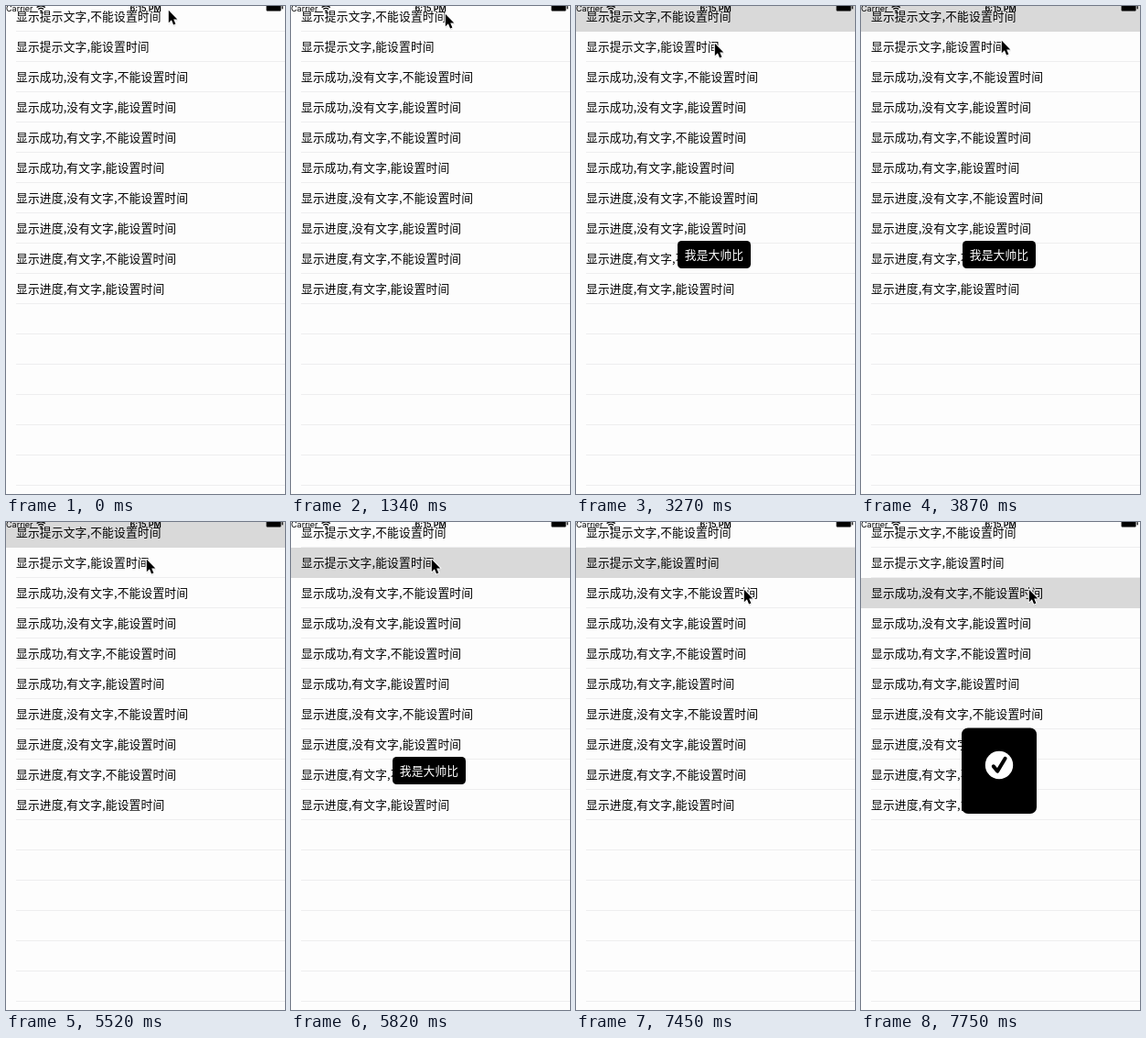
An HTML page for the animation above (8000 ms loop, 305 by 532 pixels).

```html
<!DOCTYPE html>
<html lang="zh-CN">
<head>
<meta charset="utf-8">
<style>
html, body { margin: 0; width: 100%; height: 100%; overflow: hidden; background: #fdfdfd; }
svg { display: block; width: 100vw; height: 100vh; }
.cjk { font: 12.75px "Noto Sans CJK SC", "Noto Sans CJK", sans-serif; letter-spacing: .16px; }
.bar { font: 9px Inter, "Liberation Sans", sans-serif; }
</style>
</head>
<body>
<svg viewBox="0 0 305 532" xmlns="http://www.w3.org/2000/svg">
  <g id="lines" fill="#eeeeef"></g>
  <rect id="pick" width="305" height="33" fill="#d9d9d9"/>
  <g id="rows" class="cjk"></g>

  <g class="bar">
    <text x="0" y="6.4">Carrier</text>
    <path d="M33.6 1.6Q38.2 -2 42.8 1.6M35.3 3.5Q38.2 1.3 41.1 3.5"
      fill="none" stroke="#000" stroke-width="1.3"/>
    <path d="M36.6 5Q38.2 3.8 39.8 5L38.2 6.8Z"/>
    <text x="152.7" y="6.4" text-anchor="middle" font-weight="600">6:15 PM</text>
    <rect x="284.6" y="-2" width="16" height="7.5" rx="1"/>
    <rect x="301.6" y="0" width="1.2" height="3.4" rx=".6"/>
  </g>

  <g id="toast">
    <rect x="111" y="256" width="80" height="30" rx="4.5"/>
    <text class="cjk" x="151" y="276" text-anchor="middle" fill="#fff">我是大帅比</text>
  </g>

  <g id="done">
    <rect x="110" y="224.5" width="82" height="93.5" rx="7"/>
    <circle cx="151" cy="265" r="15.2" fill="#fff"/>
    <path d="M144.8 266.4L149.2 271.6L157.6 257.8" fill="none" stroke="#000"
      stroke-width="4" stroke-linecap="round" stroke-linejoin="round"/>
  </g>

  <g id="cursor" stroke-linejoin="round">
    <path d="M.3 1.5V14.5L3.3 11.8L5.5 17L7.9 16L5.7 11H9.8Z" stroke="#000" opacity=".15"/>
    <path d="M0 0V13.4L3.1 10.5L5.3 15.8L7.6 14.8L5.4 9.7H9.5Z" stroke="#fff" stroke-width="2"
      paint-order="stroke"/>
  </g>
</svg>
<script>
const LOOP = 8000, TICK = 149.05, LEAD = 10, ROW = 33;
const $ = id => document.getElementById(id);

const topics = ['提示文字', '成功,没有文字', '成功,有文字', '进度,没有文字', '进度,有文字'];
const labels = topics.flatMap(s => ['不能', '能'].map(can => `显示${s},${can}设置时间`));

// Ticks at which each row in turn is tapped
const taps = [12, 39, 52];

// Pointer moves: first tick, last tick, end x, end y, easing power
const home = [176, 4];
const moves = [
  [8, 11, 163, 9, 3],
  [14, 16, 273, 78, .25],
  [19, 22, 150, 40, 1.5],
  [22, 24, 148, 37, 1.5],
  [24, 26, 152, 37, 1.5],
  [36, 37, 152, 40, 1],
  [42, 44, 207, 78, 1.5],
  [48, 50, 182, 73, 2.5]
];

function add(parent, tag, attrs, text = '') {
  const el = document.createElementNS('http://www.w3.org/2000/svg', tag);
  for (const key in attrs) el.setAttribute(key, attrs[key]);
  el.textContent = text;
  parent.append(el);
}

labels.forEach((text, i) => add($('rows'), 'text', { x: 11, y: 16.3 + i * ROW }, text));
for (let i = 0; i < 16; i++) {
  add($('lines'), 'rect', { x: 11, y: 27 + i * ROW, width: 294, height: 1 });
}

const within = (n, from, to) => n >= from && n < to;
const show = (id, on) => $(id).setAttribute('visibility', on ? 'visible' : 'hidden');

function pointerAt(n) {
  let [x, y] = home;
  for (const [from, to, endX, endY, power] of moves) {
    const left = Math.min(1, Math.max(0, (to - n) / (to - from)));
    const p = 1 - left ** power;
    x += (endX - x) * p;
    y += (endY - y) * p;
  }
  return [Math.round(x), Math.round(y)];
}

function draw(t) {
  const n = Math.floor((t + LEAD) / TICK);
  const [x, y] = pointerAt(n);
  const row = taps.filter(tap => n >= tap).length - 1;
  $('cursor').setAttribute('transform', `translate(${x + 1.8} ${y + .8})`);
  $('pick').setAttribute('y', row * ROW - 5);
  show('pick', row >= 0);
  show('toast', within(n, taps[0], 34) || within(n, taps[1], 46));
  show('done', n >= taps[2]);
}

const start = performance.now();
function tick() {
  draw((performance.now() - start) % LOOP);
  requestAnimationFrame(tick);
}
tick();
</script>
</body>
</html>
```
